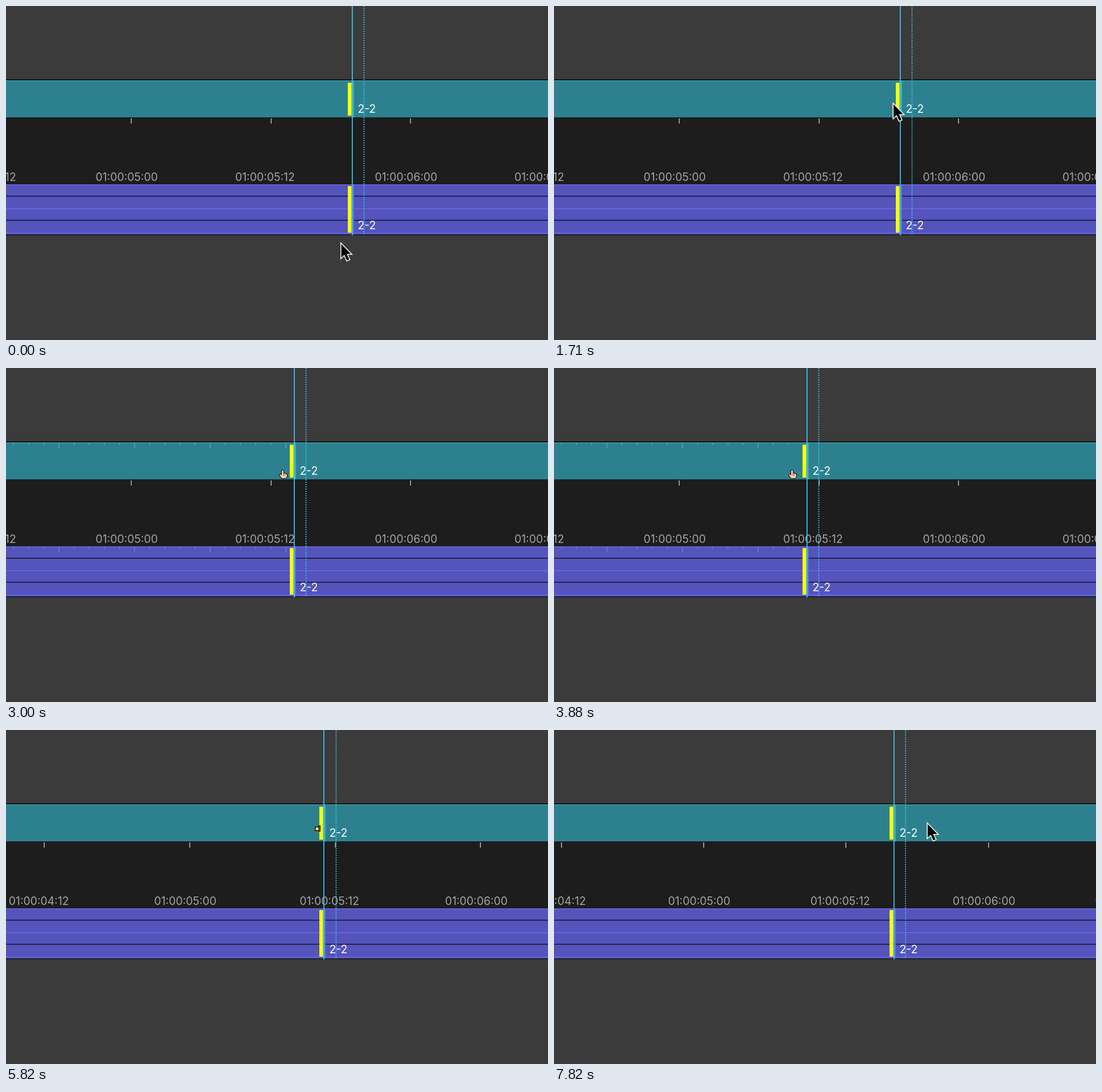
Recreate the animation shown at these times as an HTML page with a canvas. Size 953 px wide and 588 px high, loop 9760 ms.

```html
<!DOCTYPE html>
<html lang="en">
<head>
<meta charset="utf-8">
<title>Timeline trim</title>
<style>
html, body { margin: 0; width: 100%; height: 100%; overflow: hidden; background: #3b3b3b; }
canvas { display: block; }
</style>
</head>
<body>
<canvas id="stage" width="953" height="588"></canvas>
<script>
const ctx = document.getElementById('stage').getContext('2d');
const W = 953, LOOP = 9760;
const FONT = '19.4px Inter, "Open Sans", sans-serif';

// Each view: start time, 05:00 tick position, tick pitch, playhead, frame width, first tall clip tick
const views = [
  { from: 0, tick: 220.5, pitch: 245.5, head: 608.5, step: -20.4, tall: 93 },
  { from: 4710, tick: 323.5, pitch: 255.7, head: 559, step: 21.3, tall: 40 },
  { from: 7820, tick: 263.5, pitch: 250.3, head: 598, step: 20, tall: 0 }
];

const clicks = [[1060, 597, 175.5], [2060, 597, 170], [6350, 549, 167]];

function rect(color, x, y, w, h) {
  ctx.fillStyle = color;
  ctx.fillRect(x, y, w, h);
}

// Linear interpolation through [time, value] points
function along(t, points) {
  if (t <= points[0][0]) return points[0][1];
  for (let i = 1; i < points.length; i++) {
    const [a, u] = points[i - 1], [b, v] = points[i];
    if (t < b) return u + (v - u) * (t - a) / (b - a);
  }
  return points[points.length - 1][1];
}

function framesDragged(t) {
  if (t < 4710) return Math.floor(along(t, [[2060, 0], [2320, 1], [2980, 5], [3760, 8]]));
  if (t < 7820) return Math.floor(along(t, [[6400, 0], [6780, 2], [7250, 5]]));
  return 0;
}

function text(str, x, y, color) {
  ctx.font = FONT;
  ctx.fillStyle = color;
  ctx.fillText(str, x, y);
}

function drawTracks() {
  rect('#3b3b3b', 0, 0, W, 588);
  rect('#111', 0, 129, W, 2);
  rect('#2d818f', 0, 131, W, 65);
  rect('#45aebb', 0, 131, W, 1);
  rect('#1d1d1d', 0, 196, W, 118);
  rect('#5454bc', 0, 314, W, 88);
  for (const y of [314, 356, 399]) rect('#6b68e2', 0, y, W, 1.5);
  for (const y of [334, 376.5, 402]) rect('#15152a', 0, y, W, 1.5);
}

function drawRuler(view) {
  for (let i = -1; i < 4; i++) {
    const x = view.tick + i * view.pitch, half = 10 + i;
    rect('#bbb', Math.floor(x) - 0.5, 198, 1.5, 9);
    text(`01:00:0${half >> 1}:${half % 2 ? '12' : '00'}`, x - 63, 308, '#a5a5a5');
  }
}

function drawClipTicks(first, end) {
  for (let i = -3; i < 25; i++) {
    const x = first + i * 26.6, h = i % 5 ? 4 : 9;
    if (x < 6 || x > end) continue;
    rect('#3fadba', x - 0.75, 132, 1.5, h);
    rect('#7673ee', x - 0.75, 315, 1.5, h);
  }
}

function drawCut(x, gap) {
  rect('#3fa9b8', x, 132, 3, 64);
  rect('#5277dc', x, 315, 3, 87);
  rect('#ff0', x - 8, 135, 6.5, 58);
  rect('#ff0', x - 8, 317, 6.5, 82);
  text('2-2', x + 9.5, 188, '#fff');
  text('2-2', x + 9.5, 393, '#fff');
  rect('#35c5ee', x - 1, 0, 1.75, 404);
  for (let y = 0; y < 404; y += 4) rect('#35c5ee', x + gap - 0.75, y, 1.75, 2);
}

function drawClick(t, [start, x, y]) {
  const age = t - start;
  if (age < 0 || age >= 780) return;
  const r = age < 126 ? 9 + 33 * age / 126 : 42 * Math.exp((126 - age) / 208);
  ctx.fillStyle = 'rgba(255,50,50,.85)';
  ctx.beginPath();
  ctx.arc(x, y, r, 0, 7);
  ctx.fill();
}

function shape(path, x, y, fill, stroke, width) {
  ctx.save();
  ctx.translate(x, y);
  const p = new Path2D(path);
  ctx.lineWidth = width;
  ctx.strokeStyle = stroke;
  ctx.stroke(p);
  ctx.fillStyle = fill;
  ctx.fill(p);
  ctx.restore();
}

function arrow(x, y) {
  shape('M1 2V26L6.5 21L11 31L15 29.2L10.7 19.5H18Z', x, y, '#000', '#fff', 3);
}

function hand(x, y) {
  shape('M-2 1Q0-1 1 1V6L3 5.5L5 6.5L7 7.5V11L5 14H-2L-4 11L-6 8.5Q-5 6-2 9Z', x, y, '#fbd0ac', '#111', 2.2);
  rect('#5b3a28', x + 0.7, y + 6, 0.8, 4);
  rect('#5b3a28', x + 3, y + 7, 0.8, 3);
}

function trimmer(x, y) {
  rect('#111', x, y + 2, 8, 8);
  rect('#ffe93b', x + 1.5, y + 3.5, 5, 5);
  shape('M6 .8H9.3V10H6', x, y, 'transparent', '#111', 1.6);
}

function drawCursor(t) {
  if (t < 1060) {
    const k = along(t, [[60, 0], [760, 1]]), s = k * k * (3 - 2 * k);
    arrow(588.5 + 8 * s + 74 * s * (1 - s), 417 - 243 * s);
  } else if (t < 2060) {
    arrow(596, 171);
  } else if (t < 4710) {
    hand(along(t, [[2060, 597], [2350, 550], [3000, 487], [3880, 419]]), 180);
  } else if (t < 5300) {
    arrow(along(t, [[5130, 432], [5300, 531]]), 161);
  } else if (t < 6350) {
    const [x, y] = t < 5530 ? [542, 167] : t < 5590 ? [541, 166]
      : t < 5820 ? [545, 166] : t < 6180 ? [543, 168] : [538, 168];
    trimmer(x, y);
  } else if (t < 7820) {
    hand(along(t, [[6350, 546], [6820, 584], [7290, 644]]), along(t, [[6350, 180], [6820, 183.5]]));
  } else {
    arrow(656, 163.5);
  }
}

function draw(t) {
  const view = views.findLast(v => t >= v.from);
  const head = view.head + view.step * framesDragged(t);
  drawTracks();
  drawRuler(view);
  if ((t >= 2060 && t < 4710) || (t >= 6350 && t < 7820)) drawClipTicks(view.tall, head - 9);
  drawCut(Math.round(head), Math.abs(view.step));
  for (const c of clicks) drawClick(t, c);
  drawCursor(t);
}

function tick() {
  draw(performance.now() % LOOP);
  requestAnimationFrame(tick);
}
tick();
</script>
</body>
</html>
```
